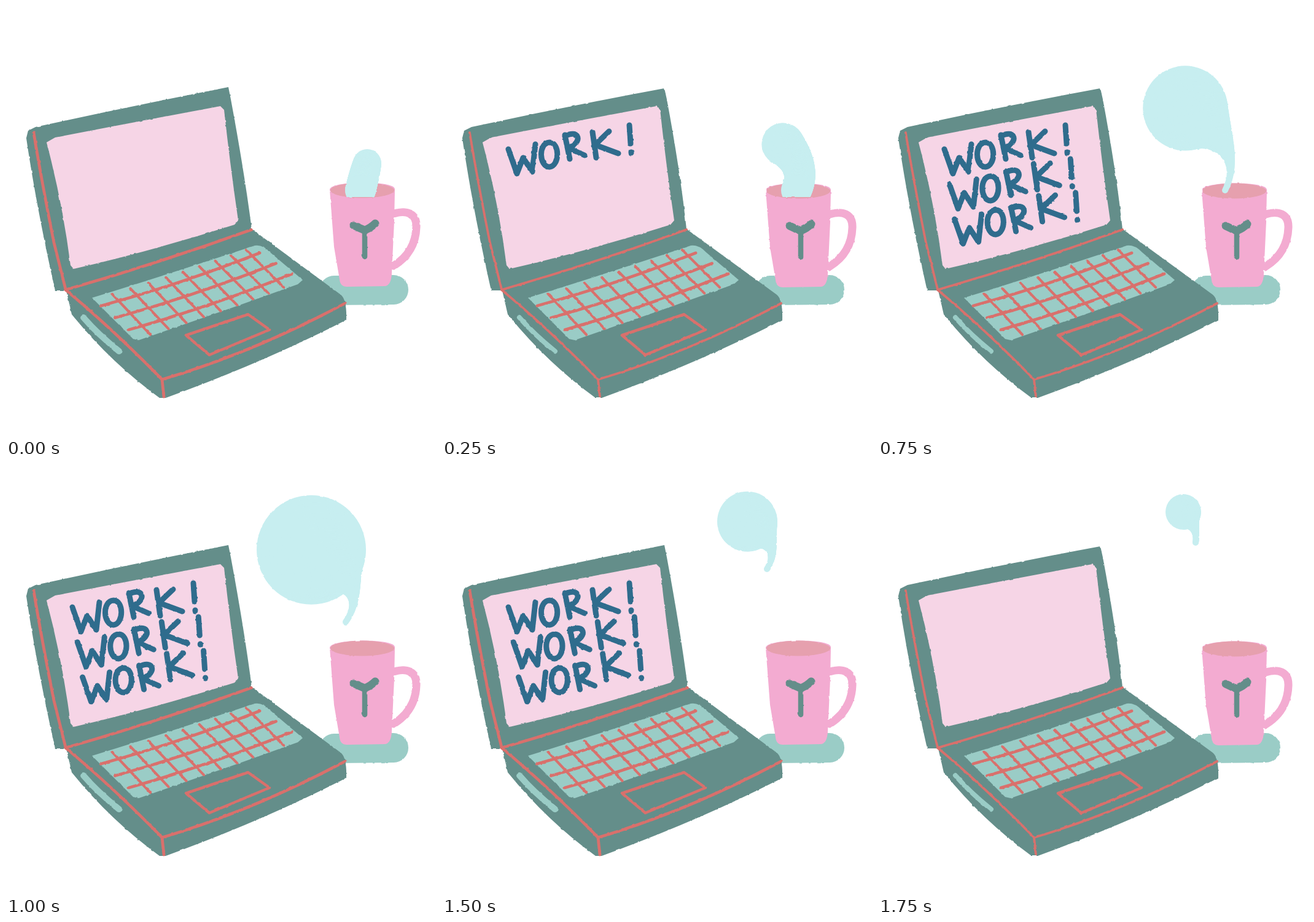
An HTML page for the animation above (2 s loop, 700 by 700 pixels).

```html
<!DOCTYPE html>
<html lang="en">
<head>
<meta charset="utf-8">
<title>Work and coffee</title>
<style>
  html, body { margin: 0; width: 100%; height: 100%; overflow: hidden; background: #fff; }
  svg { display: block; width: 100%; height: 100%; }
  .line { fill: none; stroke-linecap: round; stroke-linejoin: round; }
</style>
</head>
<body>
<svg viewBox="0 0 700 700" xmlns="http://www.w3.org/2000/svg">
  <filter id="rough" filterUnits="userSpaceOnUse" x="0" y="0" width="700" height="700" color-interpolation-filters="sRGB">
    <feTurbulence id="grain" type="fractalNoise" baseFrequency="0.12" numOctaves="2"/>
    <feDisplacementMap in="SourceGraphic" scale="2.5" xChannelSelector="R" yChannelSelector="G"/>
  </filter>
  <clipPath id="aboveCoffee"><rect width="700" height="311"/></clipPath>
  <g id="art" filter="url(#rough)"></g>
</svg>
<script>
const STEP = 250;
const FRAMES = 8;
const C = {
  teal: '#648e8a', screen: '#f6d5e6', coral: '#d9706c', mint: '#9accc6',
  mug: '#f3abd1', coffee: '#e6a0ae', steam: '#c7eef0', ink: '#2f6c8d'
};

// Each letter's strokes, and how far it drops from one written line to the next.
const LETTERS = [
  ['M108 233L122 273L132 247L147 270L152 225', 57],
  ['M175 222C156 223 158 262 175 262C192 260 192 222 175 222Z', 55],
  ['M200 210L208 249M200 212C224 199 230 223 205 231L232 243', 59],
  ['M245 205L251 247M272 204L249 226L287 240', 52],
  ['M305 194L307 224M308 238v1', 55]
];

const lerp = (a, b, u) => a + (b - a) * u;
const mix = (p, q, u) => p.map((v, i) => lerp(v, q[i], u));
const repeat = (n, make) => Array.from({ length: n }, (_, i) => make(i)).join('');
const line = (d, color, width) =>
  `<path class="line" d="${d}" stroke="${color}" stroke-width="${width}"/>`;
const shape = (d, color) => `<path d="${d}" fill="${color}"/>`;

function keyboard() {
  const rows = repeat(3, i => {
    const [x, y] = mix([155, 488], [200, 527], i / 2);
    const [ex, ey] = mix([413, 402], [466, 436], i / 2);
    return `M${x} ${y}Q${(x + ex) / 2} ${(y + ey) / 2 + 8} ${ex} ${ey}`;
  });
  const columns = repeat(9, i => {
    const bow = 6 * Math.sin(Math.PI * i / 8);
    const [x, y] = mix([173, 469], [391, 397], i / 8);
    const [ex, ey] = mix([235, 535], [452, 458], i / 8);
    return `M${x + bow} ${y}L${ex + bow} ${ey}`;
  });
  return shape('M140 475Q260 438 405 390Q418 388 430 401L483 446L475 453L380 487L216 544L207 542Z', C.mint)
    + line(rows, C.coral, 4.8) + line(columns, C.coral, 4.2);
}

function laptop(alt) {
  const edge = alt ? 398 : 400;
  const top = alt ? 134 : 132;
  const width = alt ? 3.8 : 4.8;
  return shape(`M36 203L48 197Q205 163 362 ${top}L366 152Q388 270 ${edge} 363L545 470Q555 478 554 511`
      + 'Q420 580 260 638H250Q170 580 107 502L98 463H80Q50 330 33 215Z', C.teal)
    + shape('M66 222L80 214Q215 188 349 163L355 169Q365 260 378 349L372 356Q240 398 110 428L105 422Q92 320 66 222Z', C.screen)
    + line('M45 206Q58 285 78 385L97 461', C.coral, width)
    + line(`M97 462Q250 418 ${edge} 364`, C.coral, width)
    + line('M97 462Q175 527 254 608L257 636', C.coral, width)
    + line('M254 608Q400 565 552 484', C.coral, width)
    + keyboard()
    + line('M293 536L394 502L429 527L331 568Z', C.coral, 4.6)
    + line('M126 507Q148 533 184 562', C.mint, alt ? 8 : 10);
}

function cup(alt) {
  return `<g transform="translate(0 ${alt ? 1 : 0})">`
    + line('M631 338C652 332 669 337 668 360C667 390 652 410 631 423', C.mug, 13)
    + shape('M527 299C528 284 633 284 633 298L632 350L628 435Q627 455 617 456L555 457Q544 457 543 445L534 392Z', C.mug)
    + `<ellipse cx="580" cy="300" rx="52" ry="12.5" fill="${C.coffee}"/>`
    + line('M584 367V408', C.teal, 8.5)
    + line('M566 357Q574 361 584 365Q594 361 601 354', C.teal, 13)
    + '</g>';
}

// A round puff swells, drifts up and shrinks; its tail leaves the cup halfway.
function steam(step) {
  const inCup = step < 3;
  const radius = step <= 4 ? 23 + 66 * (step / 4) ** 1.25 : 89 - 20 * (step - 4);
  const head = [
    497 + 91 * Math.max(0, 1 - step / 3.2) ** 1.2,
    78 + 178 * (1 - step / 7) ** 1.25
  ];
  const tip = [577 - 12 * Math.max(0, step - 2), 300 - 43 * Math.max(0, step - 3)];
  const tipRadius = inCup ? 25 : 5;
  const bulge = 35 * Math.sin(Math.PI * step / 7.5);
  const dots = 60;
  const puffs = repeat(dots + 1, i => {
    const u = i / dots;
    const [x, y] = mix(head, tip, u);
    const r = lerp(tipRadius, radius, (1 - u) ** 2.8);
    return `<circle cx="${x + 4 * u * (1 - u) * bulge}" cy="${y}" r="${r}"/>`;
  });
  return `<g fill="${C.steam}" clip-path="url(#aboveCoffee)">${puffs}</g>`;
}

function writing(step) {
  const rows = step === FRAMES - 1 ? 0 : Math.min(step, 3);
  return repeat(rows, row => LETTERS.map(([d, drop]) =>
    `<g transform="translate(${row * 8.3} ${row * drop})">${line(d, C.ink, 9)}</g>`).join(''));
}

const art = document.getElementById('art');
const grain = document.getElementById('grain');
let shown = -1;

function draw(step) {
  const alt = step % 2 === 1;
  grain.setAttribute('seed', alt ? 9 : 4);
  art.innerHTML = line('M534 463L631 462', C.mint, 48)
    + laptop(alt) + writing(step) + cup(alt) + steam(step);
}

function tick(now) {
  const step = Math.floor(now / STEP) % FRAMES;
  if (step !== shown) draw(shown = step);
  requestAnimationFrame(tick);
}
draw(shown = 0);
requestAnimationFrame(tick);
</script>
</body>
</html>
```
